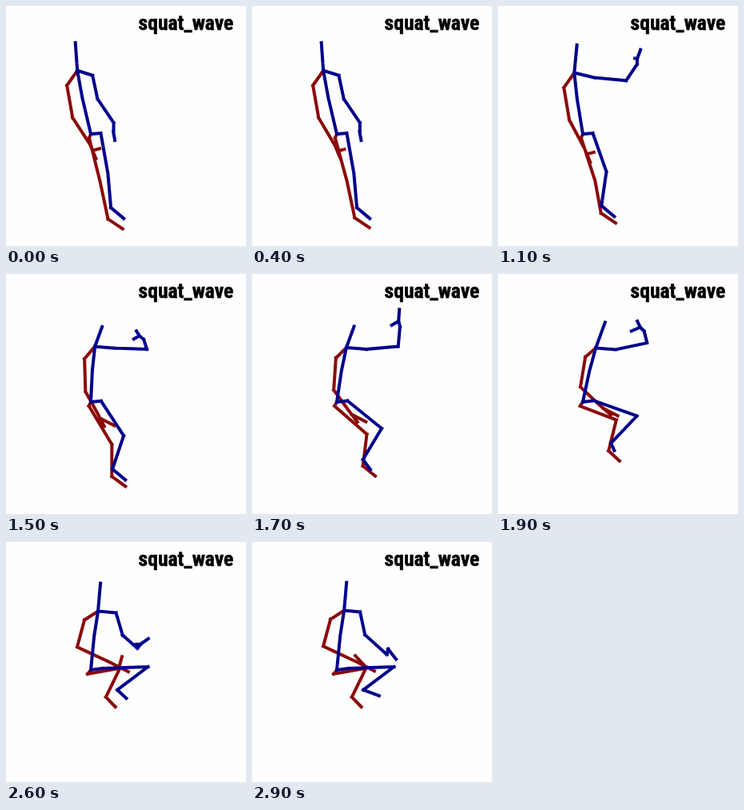
An HTML page for the animation above (3 s loop, 300 by 300 pixels).

```html
<!DOCTYPE html>
<html lang="en">
<head>
<meta charset="utf-8">
<title>squat_wave</title>
<style>
html, body { margin: 0; width: 100%; height: 100%; overflow: hidden; background: #fefefe; }
svg { display: block; width: 100%; height: 100%; }
path { fill: none; stroke-width: 4; stroke-linecap: square; }
text {
  font: 900 25.6px Impact, "Roboto Condensed", Roboto, sans-serif;
  font-stretch: 75%;
  stroke: #000;
  stroke-width: 0.5;
}
</style>
</head>
<body>
<svg viewBox="0 0 300 300">
  <path id="right" stroke="#8b0a0a"/>
  <path id="left" stroke="#00008b"/>
  <text x="284.3" y="30" text-anchor="end">squat_wave</text>
</svg>
<script>
const LOOP = 3000, STEP = 100;
const hip = [106, 160];
const rightPath = document.getElementById("right");
const leftPath = document.getElementById("left");

const shift = (p, dx, dy) => [p[0] + dx, p[1] + dy];
const mix = (a, b, k) => [a[0] + (b[0] - a[0]) * k, a[1] + (b[1] - a[1]) * k];

// End of a bone: 0 degrees hangs down, 90 points right, 180 points up
function reach(p, len, deg) {
  const a = deg * Math.PI / 180;
  return shift(p, len * Math.sin(a), len * Math.cos(a));
}

// Every bone is its own stroke, so joints keep their square ends
function bones(...pts) {
  let d = "";
  for (let i = 1; i < pts.length; i++) {
    d += "M" + pts[i - 1].map(v => v.toFixed(2)) + "L" + pts[i].map(v => v.toFixed(2));
  }
  return d;
}

function draw(t) {
  const part = (a, b) => Math.min(1, Math.max(0, (t - a) / (b - a)));
  const ease = (a, b) => { const u = part(a, b); return u * u * (3 - 2 * u); };
  const pulse = (a, b) => Math.sin(part(a, b) * Math.PI) ** 2;

  // Phases shared by several limbs
  const squat = ease(1200, 2300);
  const lift = ease(500, 800);
  const raise = ease(800, 1100);
  const curl = ease(1100, 1500);
  const wave = pulse(1550, 1950);
  const drop = ease(1900, 2300);
  const settle = ease(2300, 2900);

  // Trunk
  const lean = -12 + 26 * ease(800, 2000) - 7 * ease(1900, 2600);
  const chest = reach(hip, 81 - 12 * ease(800, 1600) + 6 * ease(1700, 2900), 180 - lean);
  const nod = -4 + 24 * ease(800, 1500) - 15 * ease(1900, 2600);
  const head = reach(chest, 35 - 9 * pulse(1100, 2000), 180 - nod);
  const neck = mix(chest, head, 0.31);
  const spine = shift(mix(chest, hip, 0.43), -1, 0);

  // Left leg
  const hipL = shift(hip, 12.5 + 2 * squat, -1 - squat);
  const kneeL = reach(hipL, 51 + 6 * ease(1400, 1900), 10 + 10 * ease(800, 1150) + 72 * squat);
  const bendL = ease(1200, 2200);
  const ankleL = reach(kneeL, 43 + 5 * bendL, 5 - 14 * ease(500, 1200) - 44 * bendL);
  const turn = ease(1500, 1900);
  const footL = reach(ankleL, 21 - 11 * turn + 11 * settle, 50 - 26 * turn + 46 * settle);

  // Right leg
  const hipR = shift(hip, -2 - 2 * squat, 5);
  const kneeR = reach(hipR, 56 - 15 * ease(1500, 2300), 14 + 4 * ease(0, 1100) + 82 * ease(1200, 2400));
  const ankleR = reach(kneeR, 48 - 8 * ease(0, 1500), 12 - 38 * ease(900, 2500));
  const footR = reach(ankleR, 22 - 5 * squat, 56 - 12 * squat);

  // Right arm
  const shoulderR = shift(chest, -13 - 4 * drop, 18.5 - 7.5 * ease(1100, 2000));
  const elbowR = reach(shoulderR, 41 - 6 * ease(1500, 2300), 10 - 25 * ease(1000, 2300));
  const wristR = reach(elbowR, 40 - 10 * curl + 14 * ease(1800, 2300),
    33 - 5 * ease(0, 800) + 37 * ease(1400, 2400));
  const palm = 23 + 40 * ease(1300, 2300);
  const handR = reach(wristR, 8 + 6 * drop, palm);
  const tipR = reach(handR, 11 + 2 * squat, palm);
  const spread = curl - drop;
  const thumbR = reach(handR, 9 + 11 * spread + 9 * settle, 105 - 42 * spread + 118 * settle);

  // Left arm: lifts, waves, then drops
  const shoulderL = shift(chest, 19 + 6 * ease(300, 1000) - 5 * settle, 6 - 4 * curl);
  const elbowL = reach(shoulderL, 30 + 10 * raise - 11 * drop,
    12 + 76 * ease(750, 1150) + 14 * ease(1500, 1900) - 90 * ease(1950, 2700));
  const fore = 34 + 37 * lift + 127 * ease(780, 1350) - 27 * wave - 150 * ease(1900, 2350);
  const wristL = reach(elbowL, 36 - 23 * ease(800, 1400) + 14 * wave + 24 * settle, fore);
  const grip = fore - 34 + 36 * lift + 30 * raise - 15 * wave + 38 * drop + 49 * settle;
  const handL = reach(wristL, 13 - 6 * raise, grip);
  const tipL = reach(handL, 9 + 3 * ease(500, 1100) - 5 * curl + 9 * wave + 9 * settle,
    grip + 10 - 28 * lift + 113 * drop - 224 * settle);
  const thumbL = reach(handL,
    2 + 6 * lift - 5 * pulse(900, 1300) + 4 * ease(1500, 1900) - 12 * settle,
    190 + 110 * ease(800, 1300) - 25 * ease(1700, 2300));

  rightPath.setAttribute("d",
    bones(chest, shoulderR, elbowR, wristR, handR, tipR) + bones(handR, thumbR) +
    bones(hip, hipR, kneeR, ankleR, footR));
  leftPath.setAttribute("d",
    bones(head, neck, chest, spine, hip) +
    bones(chest, shoulderL, elbowL, wristL, handL, tipL) + bones(handL, thumbL) +
    bones(hip, hipL, kneeL, ankleL, footL));
}

const start = performance.now();
function tick() {
  const t = (performance.now() - start) % LOOP;
  draw(Math.floor(t / STEP) * STEP);
  requestAnimationFrame(tick);
}
tick();
</script>
</body>
</html>
```
